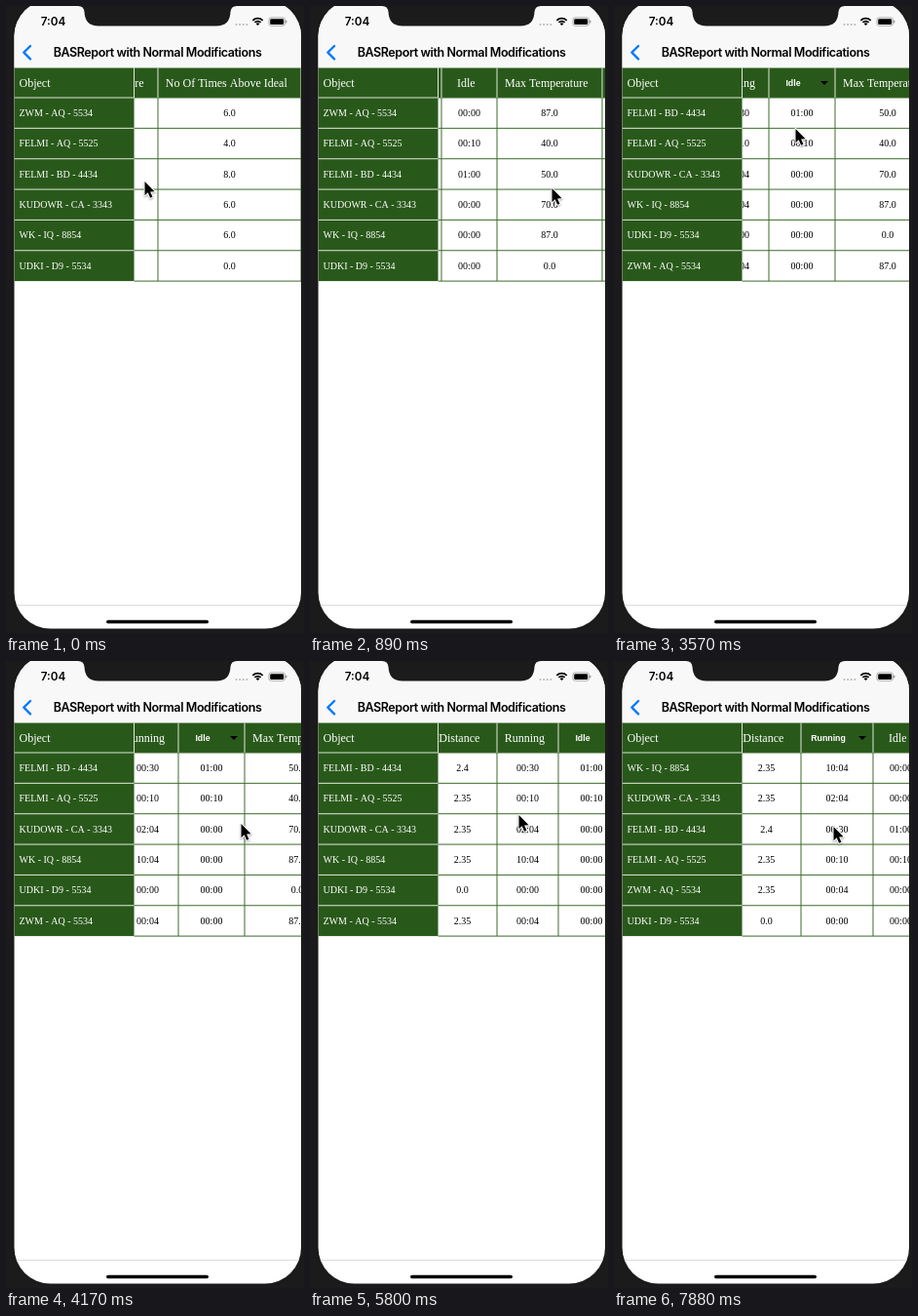
These frames come from a looping animation (306 by 643 pixels, 8000 ms). An HTML page with a canvas:

```html
<!DOCTYPE html>
<html lang="en">
<head>
<meta charset="utf-8">
<title>Sortable report</title>
<style>
html, body { margin: 0; width: 100%; height: 100%; overflow: hidden; background: #1b1b1b; }
canvas { display: block; width: 306px; height: 643px; }
</style>
</head>
<body>
<canvas id="stage"></canvas>
<script>
const W = 306, H = 643, LOOP = 8000;
const TICK_START = 140, TICK = 148.5; // the screen refreshes in ticks
const GREEN = '#29591a', LINE = '#3c6d2c', PALE = '#dfe6da', DARK = '#1b1b1b';
const SERIF = '"Liberation Serif", serif', SANS = '"Liberation Sans", sans-serif', UI = 'Inter, sans-serif';
const HEAD_TOP = 63.5, HEAD_BOTTOM = 94, ROW = 31.35, FIXED_RIGHT = 131.5;
const TABLE_BOTTOM = HEAD_BOTTOM + 6 * ROW;

const columns = [
  { title: 'Distance', width: 71 },
  { title: 'Running', width: 63 },
  { title: 'Idle', width: 57 },
  { title: 'Max Temperature', width: 108 },
  { title: 'No Of Times Above Ideal', width: 147 },
];
const rows = [
  ['ZWM - AQ - 5534', '2.35', '00:04', '00:00', '87.0', '6.0'],
  ['FELMI - AQ - 5525', '2.35', '00:10', '00:10', '40.0', '4.0'],
  ['FELMI - BD - 4434', '2.4', '00:30', '01:00', '50.0', '8.0'],
  ['KUDOWR - CA - 3343', '2.35', '02:04', '00:00', '70.0', '6.0'],
  ['WK - IQ - 8854', '2.35', '10:04', '00:00', '87.0', '6.0'],
  ['UDKI - D9 - 5534', '0.0', '00:00', '00:00', '0.0', '0.0'],
];

// Tick at which each sort order begins
const sorts = [
  { from: 0, order: '012345' },
  { from: 15, column: 'Idle', up: true, order: '054312' },
  { from: 22, column: 'Idle', order: '213450' },
  { from: 46, column: 'Running', up: true, order: '501234' },
  { from: 50, column: 'Running', order: '432105' },
];
// [tick, left edge of the Running column]
const scrollKeys = [[0, -72], [7, 96], [26, 96], [28, 114], [29, 149], [30, 168],
  [31, 178], [32, 183], [34, 186], [37, 186.6], [38, 186.6], [39, 192]];
// [tick, x, y]
const pointerKeys = [[0, 142, 180], [6, 248, 187], [9, 248, 187], [13, 186, 78], [23, 186, 78],
  [25, 186, 174], [26, 186, 174], [28, 241, 167], [34, 251, 160], [37, 230, 159], [38, 230, 159],
  [39, 214, 158], [41, 214, 158], [44, 219, 83], [50, 219, 83], [53, 225, 170]];

const canvas = document.getElementById('stage');
const ctx = canvas.getContext('2d');
const dpr = window.devicePixelRatio || 1;
canvas.width = W * dpr;
canvas.height = H * dpr;

function at(keys, tick, i = 1) {
  const next = keys.findIndex(k => k[0] > tick);
  if (next < 0) return keys[keys.length - 1][i];
  const a = keys[next - 1], b = keys[next];
  return a[i] + (b[i] - a[i]) * (tick - a[0]) / (b[0] - a[0]);
}

function rect(x, y, w, h, color) {
  ctx.fillStyle = color;
  ctx.fillRect(x, y, w, h);
}

function pill(x, y, w, h, r, color) {
  ctx.fillStyle = color;
  ctx.beginPath();
  ctx.roundRect(x, y, w, h, r);
  ctx.fill();
}

function text(s, x, y, font, color, align = 'left', spacing = 0) {
  ctx.font = font;
  ctx.fillStyle = color;
  ctx.textAlign = align;
  ctx.letterSpacing = spacing + 'px';
  ctx.fillText(s, x, y);
}

function polygon(points) {
  ctx.beginPath();
  points.forEach(([x, y]) => ctx.lineTo(x, y));
  ctx.closePath();
}

function drawStatusBar() {
  ctx.fillStyle = DARK;
  ctx.fill(new Path2D('M74 0Q80 0 80.500 6Q81 20.500 95 20.500H216Q230 20.500 230.500 6Q231 0 237 0Z'));
  text('7:04', 48.5, 20, '600 11.7px ' + UI, '#000', 'center');
  for (let i = 0; i < 4; i++) pill(235.5 + i * 3.6, 18, 2, 2, 1, '#b5b5b8');

  ctx.strokeStyle = '#000';
  ctx.lineWidth = 1.7;
  for (const r of [4.4, 7.3]) {
    ctx.beginPath();
    ctx.arc(258.5, 20, r, -Math.PI * 0.75, -Math.PI * 0.25);
    ctx.stroke();
  }
  ctx.fillStyle = '#000';
  ctx.beginPath();
  ctx.moveTo(258.5, 20);
  ctx.arc(258.5, 20, 2.6, -Math.PI * 0.75, -Math.PI * 0.25);
  ctx.fill();

  ctx.strokeStyle = '#9a9a9c';
  ctx.lineWidth = 0.8;
  ctx.beginPath();
  ctx.roundRect(269.9, 11.9, 16.6, 8.4, 2.4);
  ctx.stroke();
  pill(271.2, 13.2, 14, 5.8, 1.3, '#000');
  pill(287.2, 14.6, 1.2, 3, 0.6, '#9a9a9c');
}

function drawNavBar() {
  rect(8, 0, 296, 63, '#f8f8f8');
  ctx.strokeStyle = '#0a7aff';
  ctx.lineWidth = 2.4;
  ctx.lineCap = 'round';
  ctx.lineJoin = 'round';
  ctx.stroke(new Path2D('M25 41L18.300 47.700L25 54.400'));
  ctx.lineCap = 'butt';
  text('BASReport with Normal Modifications', 155.5, 51.5, '600 12.5px ' + UI, '#000', 'center', -0.4);
}

function drawSortedTitle(title, left, width, up) {
  text(title, left + (width - 18) / 2, 82, 'bold 8.8px ' + SANS, '#fff', 'center');
  const x = left + width - 11, tip = up ? 76.8 : 81;
  const base = up ? 80.8 : 77;
  polygon([[x - 4, base], [x + 4, base], [x, tip]]);
  ctx.fillStyle = '#000';
  ctx.fill();
}

function drawScrollingColumns(sort, runningLeft) {
  ctx.save();
  ctx.beginPath();
  ctx.rect(FIXED_RIGHT, HEAD_TOP - 1, 303 - FIXED_RIGHT, 240);
  ctx.clip();
  rect(FIXED_RIGHT, HEAD_TOP, 172, HEAD_BOTTOM - HEAD_TOP, GREEN);
  for (let i = 0; i <= 6; i++) rect(FIXED_RIGHT, HEAD_BOTTOM + i * ROW - 0.5, 172, 1, LINE);

  let left = runningLeft - columns[0].width;
  columns.forEach(({ title, width: plainWidth }, c) => {
    const sorted = title === sort.column;
    const width = plainWidth + (sorted ? 11 : 0);
    const middle = left + width / 2, right = left + width;
    if (sorted) drawSortedTitle(title, left, width, sort.up);
    else text(title, middle - 3.2, 83, '12px ' + SERIF, '#fff', 'center');
    [...sort.order].forEach((r, i) =>
      text(rows[r][c + 1], middle, 113 + i * ROW, '10px ' + SERIF, '#000', 'center'));
    rect(right - 0.5, HEAD_TOP, 1, HEAD_BOTTOM - HEAD_TOP, PALE);
    rect(right - 0.5, HEAD_BOTTOM, 1, TABLE_BOTTOM - HEAD_BOTTOM, LINE);
    left = right;
  });
  ctx.restore();
}

function drawFixedColumn(sort) {
  rect(8.5, HEAD_TOP, FIXED_RIGHT - 8.5, TABLE_BOTTOM - HEAD_TOP, GREEN);
  text('Object', 13.5, 83, '12px ' + SERIF, '#fff');
  [...sort.order].forEach((r, i) => {
    rect(8.5, HEAD_BOTTOM + i * ROW - 0.5, FIXED_RIGHT - 8.5, 1, PALE);
    text(rows[r][0], 13.5, 113 + i * ROW, '10px ' + SERIF, '#fff');
  });
  rect(FIXED_RIGHT - 0.5, HEAD_TOP, 1, HEAD_BOTTOM - HEAD_TOP, PALE);
  rect(FIXED_RIGHT - 0.5, HEAD_BOTTOM, 1, TABLE_BOTTOM - HEAD_BOTTOM, '#8fa886');
}

function drawPointer(x, y) {
  ctx.save();
  ctx.translate(x, y);
  polygon([[0.5, 0], [0.5, 14.2], [3.7, 11.2], [6.1, 16.8], [8.5, 15.8], [6.1, 10.4], [10.6, 10.2]]);
  ctx.lineJoin = 'round';
  ctx.lineWidth = 2;
  ctx.strokeStyle = '#fff';
  ctx.shadowColor = 'rgba(0,0,0,.35)';
  ctx.shadowBlur = 2 * dpr;
  ctx.shadowOffsetY = dpr;
  ctx.stroke();
  ctx.shadowColor = 'transparent';
  ctx.fillStyle = '#000';
  ctx.fill();
  ctx.restore();
}

function draw(time) {
  const tick = Math.max(0, Math.floor((time - TICK_START) / TICK) + 1);
  const sort = sorts.filter(s => s.from <= tick).pop();

  ctx.setTransform(dpr, 0, 0, dpr, 0, 0);
  rect(0, 0, W, H, DARK);
  ctx.save();
  ctx.beginPath();
  ctx.roundRect(8.5, -6, 294.5, 644.5, 37);
  ctx.clip();
  rect(0, 0, W, H, '#fff');
  drawNavBar();
  drawStatusBar();
  drawScrollingColumns(sort, Math.round(at(scrollKeys, tick)));
  drawFixedColumn(sort);
  rect(8, 614, 296, 1, '#dcdcdc');
  pill(103, 629.7, 105, 3.6, 1.8, '#000');
  ctx.restore();
  drawPointer(at(pointerKeys, tick, 1), at(pointerKeys, tick, 2));
}

const start = performance.now();
function frame() {
  draw((performance.now() - start) % LOOP);
  requestAnimationFrame(frame);
}
frame();
</script>
</body>
</html>
```
